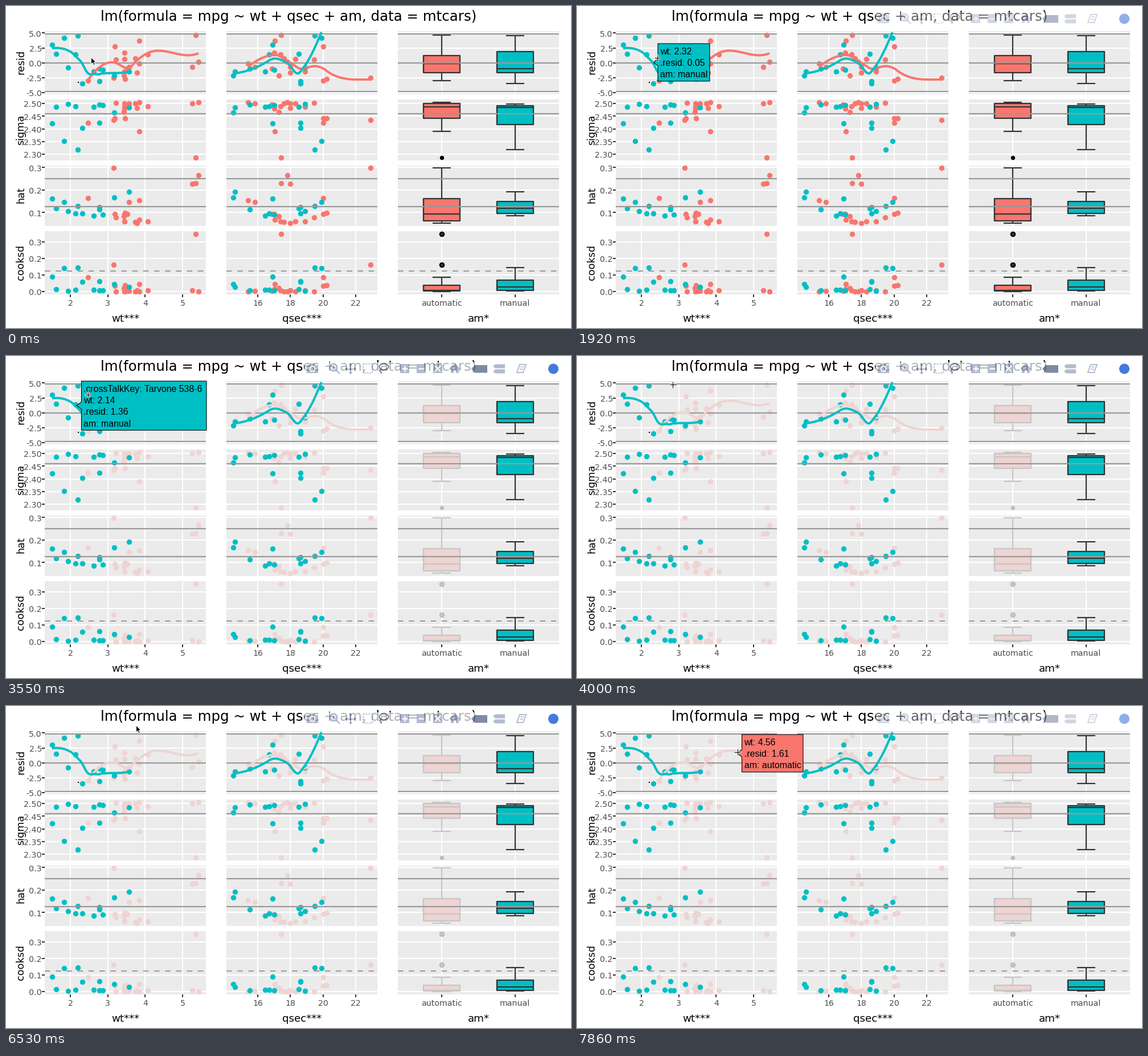
These frames come from a looping animation (992x565 px, 8000 ms). A matplotlib script:

```python
import numpy as np
import matplotlib.pyplot as plt
from matplotlib.animation import FuncAnimation
from matplotlib.collections import LineCollection, PatchCollection
from matplotlib.colors import to_rgb
from matplotlib.patches import Circle, Ellipse, Polygon, Rectangle

W, H, DPI = 992, 565, 64
INTERVAL, LOOP = 50, 8000
RED, TEAL, PANEL, DARK, RULE = "#F8766D", "#00BFC4", "#EBEBEB", "#333333", "#999999"

plt.rcParams["font.family"] = "DejaVu Sans"
fig = plt.figure(figsize=(W / DPI, H / DPI), dpi=DPI, facecolor="white")
ax = fig.add_axes([0, 0, 1, 1])
ax.set(xlim=(0, W), ylim=(H, 0))
ax.axis("off")


def px(size):
    return size * 72 / DPI


def faded(color):
    return tuple(0.2 * c + 0.8 * p for c, p in zip(to_rgb(color), to_rgb(PANEL)))


def label(x, y, text, size, **kw):
    kw = {"ha": "center", "va": "baseline", "zorder": 7, **kw}
    return ax.text(x, y, text, fontsize=px(size), **kw)


def segments(lines, color, width, zorder, **kw):
    return ax.add_collection(LineCollection(
        lines, colors=[color], linewidths=px(width), zorder=zorder, **kw), autolim=False)


def dots(points, color, diameter, zorder, **kw):
    kw = {"linewidths": 0, **kw}
    x, y = np.array(points).T
    return ax.scatter(x, y, s=px(diameter) ** 2, color=color, zorder=zorder, **kw)


# Linear model and its diagnostics
wt = np.array([2.62, 2.875, 2.32, 3.215, 3.44, 3.46, 3.57, 3.19, 3.15, 3.44, 3.44,
               4.07, 3.73, 3.78, 5.25, 5.424, 5.345, 2.2, 1.615, 1.835, 2.465, 3.52,
               3.435, 3.84, 3.845, 1.935, 2.14, 1.513, 3.17, 2.77, 3.57, 2.78])
qsec = np.array([16.46, 17.02, 18.61, 19.44, 17.02, 20.22, 15.84, 20, 22.9, 18.3, 18.9,
                 17.4, 17.6, 18, 17.98, 17.82, 17.42, 19.47, 18.52, 19.9, 20.01, 16.87,
                 17.3, 15.41, 17.05, 18.9, 16.7, 16.9, 14.5, 15.5, 14.6, 18.6])
mpg = np.array([21, 21, 22.8, 21.4, 18.7, 18.1, 14.3, 24.4, 22.8, 19.2, 17.8,
                16.4, 17.3, 15.2, 10.4, 10.4, 14.7, 32.4, 30.4, 33.9, 21.5, 15.5,
                15.2, 13.3, 19.2, 27.3, 26, 30.4, 15.8, 19.7, 15, 21.4])
manual = np.zeros(32, bool)
manual[np.r_[0:3, 17:20, 25:32]] = True

design = np.column_stack([np.ones(32), wt, qsec, manual])
n, p = design.shape
resid = mpg - design @ np.linalg.lstsq(design, mpg, rcond=None)[0]
hat = np.sum(design @ np.linalg.inv(design.T @ design) * design, axis=1)
sse = np.sum(resid ** 2)
s = np.sqrt(sse / (n - p))
sigma = np.sqrt((sse - resid ** 2 / (1 - hat)) / (n - p - 1))
cooksd = resid ** 2 * hat / (p * s ** 2 * (1 - hat) ** 2)


def cuts(x, lo, hi, cell):
    """Split points of a one-dimensional k-d tree."""
    if len(x) <= cell:
        return []
    m = (len(x) - 1) // 2
    while m > 0 and x[m - 1] == x[m]:
        m -= 1
    t = (x[m] + x[m + 1]) / 2
    if t in (lo, hi):
        return []
    return cuts(x[:m + 1], lo, t, cell) + [t] + cuts(x[m + 1:], t, hi, cell)


def loess(x, y, span=0.75):
    """Local quadratic fit at the tree nodes, cubic blending between them."""
    def fit(v):
        d = np.abs(x - v)
        h = np.sort(d)[int(len(x) * span) - 1]
        w = np.sqrt(np.clip(1 - (d / h) ** 3, 0, 1) ** 3)
        basis = np.vander(x - v, 3, increasing=True)
        return np.linalg.lstsq(basis * w[:, None], y * w, rcond=None)[0][:2]

    pad = 0.1 * np.ptp(x)
    lo, hi = x.min() - pad, x.max() + pad
    nodes = np.array([lo, *cuts(np.sort(x), lo, hi, int(len(x) * span * 0.2)), hi])
    value, slope = np.array([fit(v) for v in nodes]).T
    grid = np.linspace(x.min(), x.max(), 80)
    i = np.clip(np.searchsorted(nodes, grid) - 1, 0, len(nodes) - 2)
    step = nodes[i + 1] - nodes[i]
    u = (grid - nodes[i]) / step
    return grid, ((1 + 2 * u) * (1 - u) ** 2 * value[i] + u * (1 - u) ** 2 * step * slope[i]
                  + u * u * (3 - 2 * u) * value[i + 1] + u * u * (u - 1) * step * slope[i + 1])


# Panels: every row maps a value v to y = zero - scale * v
ROWS = [
    dict(name="resid", v=resid, top=43.5, bottom=154.5, zero=99.6, scale=10.44, mid=98,
         ticks=[5, 2.5, 0, -2.5, -5], fmt="{:.1f}", rules=[-1.96 * s, 0, 1.96 * s]),
    dict(name="sigma", v=sigma, top=164, bottom=270.5, zero=1283.5, scale=445, mid=217.5,
         ticks=[2.5, 2.45, 2.4, 2.35, 2.3], fmt="{:.2f}", rules=[s]),
    dict(name="hat", v=hat, top=279.5, bottom=386, zero=401.8, scale=395, mid=331.5,
         ticks=[0.3, 0.2, 0.1], fmt="{:.1f}", rules=[p / n, 2 * p / n]),
    dict(name="cooksd", v=cooksd, top=395, bottom=506, zero=501, scale=290, mid=450,
         ticks=[0.3, 0.2, 0.1, 0], fmt="{:.1f}", rules=[4 / n]),
]
COLS = [
    dict(name="wt***", v=wt, left=68, right=351, zero=-18.6, scale=65.77, ticks=[2, 3, 4, 5]),
    dict(name="qsec***", v=qsec, left=387, right=652, zero=-16.8, scale=28.68,
         ticks=[16, 18, 20, 22]),
    dict(name="am*", v=None, left=688, right=971, zero=636.6, scale=128.6, ticks=[1, 2]),
]

label(496, 26.3, "lm(formula = mpg ~ wt + qsec + am, data = mtcars)", 24.4, zorder=4)
grid, ticks, rules, dashes = [], [], [], []
points = {False: [], True: []}
box_fill = {False: [], True: []}
box_edge = {False: [], True: []}
outliers = []


def add_box(row, group):
    v = row["v"][manual == group]
    to_y = lambda value: row["zero"] - row["scale"] * value
    q1, median, q3 = np.quantile(v, [0.25, 0.5, 0.75], method="hazen")
    reach = 1.5 * (q3 - q1)
    inside = (v >= q1 - reach) & (v <= q3 + reach)
    x = COLS[2]["zero"] + COLS[2]["scale"] * (1 + group)
    a, b, c, lo, hi = map(to_y, (q1, median, q3, v[inside].min(), v[inside].max()))
    box_fill[group].append(Rectangle((x - 32, c), 64, a - c))
    box_edge[group] += [
        [(x - 32, a), (x - 32, c), (x + 32, c), (x + 32, a), (x - 32, a), (x - 32, c)],
        [(x - 32, b), (x + 32, b)], [(x, a), (x, lo)], [(x, c), (x, hi)],
        [(x - 16, lo), (x + 16, lo)], [(x - 16, hi), (x + 16, hi)]]
    outliers.extend((x, to_y(o)) for o in v[~inside])


for row in ROWS:
    label(31, row["mid"], row["name"], 17.6, rotation=90, rotation_mode="anchor")
    for t in row["ticks"]:
        y = row["zero"] - row["scale"] * t
        label(63, y + 6.3, row["fmt"].format(t), 14.3, ha="right", color="#4D4D4D", zorder=6)
        ticks.append([(63, y), (68, y)])
    for col in COLS:
        left, right, top, bottom = col["left"], col["right"], row["top"], row["bottom"]
        panel = ax.add_patch(Rectangle((left, top), right - left, bottom - top,
                                       fc=PANEL, lw=0, zorder=1))
        if row["name"] == "resid":
            col["panel"] = panel
        for t in row["ticks"]:
            y = row["zero"] - row["scale"] * t
            grid.append([(left, y), (right, y)])
        for t in col["ticks"]:
            x = col["zero"] + col["scale"] * t
            grid.append([(x, top), (x, bottom)])
        for r in row["rules"]:
            y = row["zero"] - row["scale"] * r
            (dashes if row["name"] == "cooksd" else rules).append([(left, y), (right, y)])
        for group in (False, True):
            if col["v"] is None:
                add_box(row, group)
                continue
            pick = manual == group
            points[group] += list(zip(col["zero"] + col["scale"] * col["v"][pick],
                                      row["zero"] - row["scale"] * row["v"][pick]))

for col in COLS:
    label((col["left"] + col["right"]) / 2, 554.5, col["name"], 18.2)
    for t in col["ticks"]:
        x = col["zero"] + col["scale"] * t
        name = ("automatic", "manual")[t - 1] if col["v"] is None else str(t)
        label(x, 525.8, name, 14.1, color="#4D4D4D")
        ticks.append([(x, 506), (x, 511)])

segments(grid, "white", 2, 2)
segments(ticks, DARK, 2, 2)
segments(rules, RULE, 2.2, 5)
segments(dashes, RULE, 2, 5, linestyles=[(0, (4.8, 4.8))])
ax.add_patch(Rectangle((126, 133), 2, 2, fc="black", lw=0, zorder=4))

fading = []  # (setter, colour) of everything in the automatic group
for group, color in ((False, RED), (True, TEAL)):
    cloud = dots(points[group], color, 9.4, 4 + 0.1 * group)
    fill = ax.add_collection(PatchCollection(box_fill[group], fc=color, lw=0, zorder=3))
    edge = segments(box_edge[group], DARK, 2.2, 3.5)
    if not group:
        fading += [(cloud.set_color, color), (fill.set_facecolor, color),
                   (edge.set_color, DARK)]
    for col in COLS[:2]:
        pick = manual == group
        x, y = loess(col["v"][pick], resid[pick])
        curve, = ax.plot(col["zero"] + col["scale"] * x, 99.6 - 10.44 * y, color=color,
                         lw=px(4), zorder=6 + 0.1 * group, solid_capstyle="butt")
        curve.set_clip_path(col["panel"])
        if not group:
            fading.append((curve.set_color, color))
for x, y in outliers:
    spot = dots([(x, y)], "black", 7.5 if y < 395 else 9.5, 4)
    fading.append((spot.set_color, "black"))
    if y > 395:
        core = dots([(x, y)], DARK, 5, 4.1)
        fading.append((core.set_color, DARK))

# Toolbar
toolbar = []  # (artist, base alpha)
NAVY, ACTIVE = ("#001F5F", 0.3), ("#001648", 0.5)


def solid(patch, style=NAVY):
    color, alpha = style
    patch.set(fc=color, lw=0, zorder=8)
    toolbar.append((ax.add_patch(patch), alpha))


def ring(patch, width, style=NAVY, **kw):
    color, alpha = style
    patch.set(fill=False, ec=color, lw=px(width), zorder=8.1, **kw)
    toolbar.append((ax.add_patch(patch), alpha))


def strokes(lines, width, style=NAVY):
    color, alpha = style
    toolbar.append((segments(lines, color, width, 8.1), alpha))


WHITE = ("white", 0.9)
solid(Rectangle((524, 11), 452, 22), ("white", 0.7))
solid(Polygon([(528, 16), (533, 16), (534, 13), (542, 13), (543, 16), (548, 16),
               (548, 30), (528, 30)]))
ring(Circle((538, 22.5), 4.5), 2, WHITE)
ring(Circle((575, 20), 6), 3)
strokes([[(579.5, 24.5), (586, 31)], [(572, 20), (578, 20)], [(575, 17), (575, 23)]], 2.5)
strokes([[(605, 15), (605, 30)], [(597, 22.5), (613, 22.5)]], 2.2)
for dx, dy in ((0, 1), (0, -1), (1, 0), (-1, 0)):
    cx, cy = 605 + 6 * dx, 22.5 + 6 * dy
    solid(Polygon([(cx + 4 * dx, cy + 4 * dy), (cx + 3.5 * dy, cy + 3.5 * dx),
                   (cx - 3.5 * dy, cy - 3.5 * dx)]))
ring(Rectangle((627, 14), 16, 16), 2, ls=(0, (1.3, 1.1)))
ring(Ellipse((663.5, 19), 16, 11), 2.2, ACTIVE)
strokes([[(658, 23), (656, 26), (659, 28), (658, 31)]], 2.2, ACTIVE)
for cx in (700, 729, 758):
    solid(Rectangle((cx - 8, 14), 16, 16))
strokes([[(695, 22), (705, 22)], [(700, 17), (700, 27)], [(724, 22), (734, 22)],
         [(753, 17), (763, 27)], [(753, 27), (763, 17)]], 2.5, WHITE)
solid(Polygon([(788, 13), (798, 23), (795, 23), (795, 30), (790, 30), (790, 25), (786, 25),
               (786, 30), (781, 30), (781, 23), (778, 23)]))
solid(Polygon([(817, 22.5), (823, 16), (845, 16), (845, 29.5), (823, 29.5)]), ACTIVE)
for cy in (18, 27):
    solid(Polygon([(855, cy), (859, cy - 3.5), (876, cy - 3.5), (876, cy + 3.5),
                   (859, cy + 3.5)]))
ring(Polygon([(902, 15), (913, 15), (908, 29), (897, 29)]), 2)
strokes([[(903, 19), (909, 19)], [(902, 23), (908, 23)]], 1.6)
solid(Circle((961, 22.5), 9), ("#447ADB", 1))


# Tooltips and pointers
def tooltip(color, tip, left, right, top, lines):
    tx, ty = tip
    bottom = top + 20.3 * len(lines) + 5
    shape = [(left, top), (right, top), (right, bottom), (left, bottom),
             (left, ty + 6.5), (tx, ty), (left, ty - 6.5)]
    parts = [ax.add_patch(Polygon(shape, fc=color, ec="black", lw=px(1.1), zorder=9))]
    for i, line in enumerate(lines):
        parts.append(label(left + 4, top + 18.8 + 20.3 * i, line, 15.9, ha="left",
                           family="Liberation Sans", zorder=9.1))
    return parts


TIPS = {
    "curve": tooltip(TEAL, (134.5, 99), 142, 233, 66,
                     ["wt: 2.32", ".resid: 0.05", "am: manual"]),
    "point": tooltip(TEAL, (124, 87), 132.5, 352, 44,
                     [".crossTalkKey: Tarvone 538-6", "wt: 2.14", ".resid: 1.36",
                      "am: manual"]),
    "faint": tooltip(RED, (281.5, 83), 289.5, 397, 50,
                     ["wt: 4.56", ".resid: 1.61", "am: automatic"]),
}

ARROW = np.array([(0, 0), (0, 12), (2.8, 9.6), (4.8, 14), (6.8, 13.1), (4.9, 8.8), (8.6, 8.8)])
arrow = ax.add_patch(Polygon(ARROW, fc="black", ec="white", lw=px(1), zorder=10))
halo = segments([], "white", 3, 10)
cross = segments([], "black", 1.1, 10.1)

# time, pointer, x, y, tooltip, toolbar opacity
STEPS = [
    (0, "arrow", 149.5, 90, None, 0),
    (140, "cross", 153.5, 98, None, 0.35),
    (290, "cross", 153.5, 98, None, 0.8),
    (440, "cross", 153, 98, None, 1),
    (730, "cross", 150, 92, "curve", 1),
    (870, "cross", 146, 86.5, "curve", 1),
    (1020, "cross", 143, 89, "curve", 1),
    (1170, "cross", 141, 91, "curve", 1),
    (1920, "cross", 141, 91, "curve", 0.6),
    (3110, "cross", 142, 84, "curve", 1),
    (3260, "cross", 143, 75, "point", 1),
    (3410, "cross", 144, 69, "point", 1),
    (3550, "cross", 144, 68, "point", 1),
    (3700, "cross", 145, 67, "point", 1),
    (3850, "cross", 152, 60, "point", 1),
    (4000, "cross", 168, 50, None, 1),
    (4150, "arrow", 193, 34, None, 1),
    (4300, "arrow", 208, 34, None, 1),
    (4450, "arrow", 222, 34, None, 1),
    (4590, "arrow", 228, 33.5, None, 1),
    (6530, "arrow", 228.5, 34, None, 1),
    (6680, "arrow", 236, 40, None, 1),
    (6830, "cross", 252, 55, None, 1),
    (6980, "cross", 267, 68, None, 1),
    (7120, "cross", 276, 76, "faint", 1),
    (7270, "cross", 280, 79, "faint", 1),
    (7420, "cross", 281.5, 80.5, "faint", 1),
    (7860, "cross", 281.5, 80.5, "faint", 0.6),
]
SELECTED_AT = 3410


def update(k):
    now = (k + 1) * INTERVAL - 1
    _, pointer, x, y, tip, opacity = [step for step in STEPS if step[0] <= now][-1]
    for name, parts in TIPS.items():
        for part in parts:
            part.set_visible(name == tip)
    for artist, alpha in toolbar:
        artist.set_visible(opacity > 0)
        artist.set_alpha(alpha * opacity)
    for setter, color in fading:
        setter(faded(color) if now >= SELECTED_AT else color)
    arrow.set_visible(pointer == "arrow")
    arrow.set_xy(ARROW + (x, y))
    for part, reach in ((halo, 6), (cross, 5.5)):
        part.set_visible(pointer == "cross")
        part.set_segments([[(x - reach, y), (x + reach, y)], [(x, y - reach), (x, y + reach)]])
    return []


anim = FuncAnimation(fig, update, frames=LOOP // INTERVAL, interval=INTERVAL,
                     repeat=True, repeat_delay=0, blit=False)
plt.show()
```
